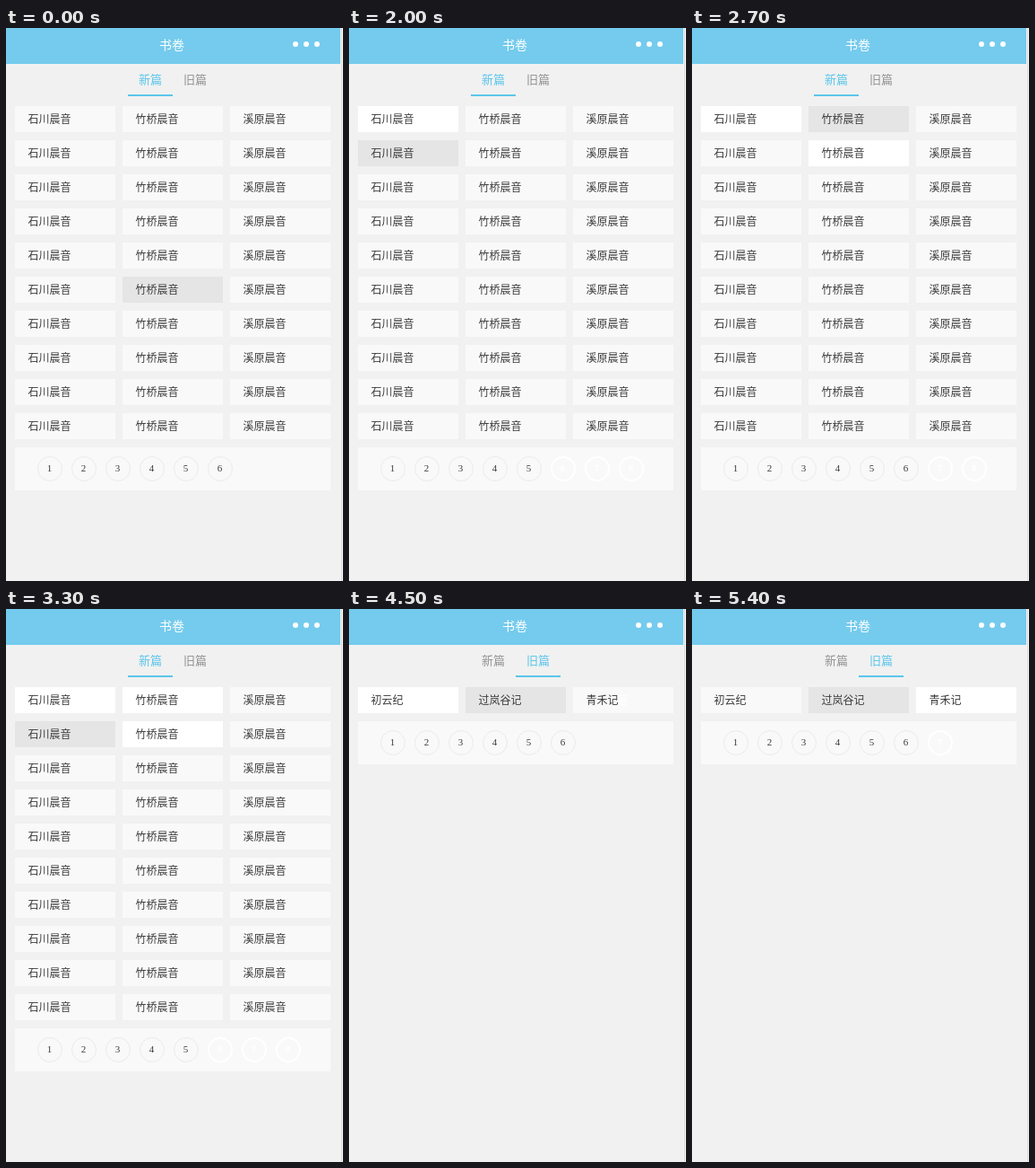
Recreate the animation shown at these times as an HTML page. Size 376x616 px, loop 6.5 s.

```html
<!DOCTYPE html>
<html lang="zh-CN">
<head>
<meta charset="utf-8">
<style>
  html, body { margin: 0; height: 100%; overflow: hidden; background: #f1f1f1; }
  svg { display: block; width: 376px; height: 616px; }
  text { font: 12px "Noto Sans CJK SC", "Noto Sans CJK", sans-serif; fill: #3c3c3c; }
  .title { font-size: 14px; fill: #fff; text-anchor: middle; }
  .tab { font-size: 13px; fill: #929292; text-anchor: middle; }
  .tab.on { fill: #5bc5ea; }
  .num { font: 11px "Liberation Serif", serif; text-anchor: middle; }
  .ring { fill: none; stroke: #ebebeb; }
  .ring.faded { stroke: #fff; stroke-width: 2; }
  .faded { fill: #fff; }
  .num.faded { font-weight: bold; }
</style>
</head>
<body>
<svg viewBox="0 0 376 616" id="stage"></svg>
<script>
const LOOP = 6500;
const NEW = ['石川晨音', '竹桥晨音', '溪原晨音'];
const OLD = ['初云纪', '过岚谷记', '青禾记'];

// Cells are "row,column"; count = chapters shown, faded = last chapter still fading out.
const states = [
  { at: 0,    tab: 0, dark: '5,1', white: [], count: 6 },
  { at: 1500, tab: 0, dark: '0,0', white: [], count: 30 },
  { at: 2000, tab: 0, dark: '1,0', white: ['0,0'], count: 5, faded: 8 },
  { at: 2400, tab: 0, dark: '1,1', white: ['0,0'], count: 6, faded: 8 },
  { at: 2700, tab: 0, dark: '0,1', white: ['0,0', '1,1'], count: 6, faded: 8 },
  { at: 3300, tab: 0, dark: '1,0', white: ['0,0', '0,1', '1,1'], count: 5, faded: 8 },
  { at: 3900, tab: 1, white: ['0,0', '0,1'], count: 0, trace: true },
  { at: 4500, tab: 1, dark: '0,1', white: ['0,0'], count: 6, trace: true },
  { at: 4800, tab: 1, dark: '0,0', white: ['0,1'], count: 5, faded: 6, trace: true },
  { at: 5200, tab: 1, dark: '0,2', white: ['0,1'], count: 7 },
  { at: 5400, tab: 1, dark: '0,1', white: ['0,2'], count: 6, faded: 7 }
];

const rect = (x, y, w, h, fill) =>
  `<rect x="${x}" y="${y}" width="${w}" height="${h}" fill="${fill}"/>`;
const text = (x, y, str, cls = '') =>
  `<text x="${x}" y="${y}" class="${cls}">${str}</text>`;

function header(tab) {
  const dots = [323, 335, 347].map(x => `<circle cx="${x}" cy="18" r="3" fill="#fff"/>`);
  return rect(0, 0, 373, 40, '#74cbed') + rect(373, 0, 3, 616, '#f3f3f3') +
    rect(374, 0, 1, 616, '#dadada') + text(185, 24, '书卷', 'title') + dots.join('') +
    ['新篇', '旧篇'].map((s, i) =>
      text(161 + 50 * i, 62, s, i === tab ? 'tab on' : 'tab')).join('') +
    rect(136 + 50 * tab, 74, 50, 2, '#5bc5ea');
}

function cells(s, rows) {
  const names = s.tab ? OLD : NEW;
  let out = '';
  for (let r = 0; r < rows; r++) {
    names.forEach((name, c) => {
      const x = 10 + 120 * c, y = 87 + 38 * r, key = r + ',' + c;
      const fill = key === s.dark ? '#e5e5e5' : s.white.includes(key) ? '#fff' : '#f9f9f9';
      out += rect(x, y, 112, 29, fill) + text(x + 14.5, y + 19, name);
    });
  }
  return out;
}

function chapters(s, top) {
  if (!s.count) return '';
  const total = Math.max(s.count, s.faded || 0);
  let out = rect(10, top, 352, 10 + 38 * Math.ceil(total / 8), '#f9f9f9');
  for (let i = 0; i < total; i++) {
    const x = 49 + 38 * (i % 8), y = top + 24 + 38 * Math.floor(i / 8);
    const cls = i < s.count ? '' : ' faded';
    out += `<circle cx="${x}" cy="${y}" r="${cls ? 13 : 13.5}" class="ring${cls}" style="fill:none"/>` +
      text(x - 0.5, y + 3, i + 1, 'num' + cls);
  }
  return out;
}

function render(s) {
  const rows = s.tab ? 1 : 10;
  const trace = s.trace ? text(300, 106, '音', 'faded') : '';
  return header(s.tab) + cells(s, rows) + trace + chapters(s, 87 + 38 * rows);
}

const stage = document.getElementById('stage');
let shown;
function frame(now) {
  const t = now % LOOP;
  const s = states.findLast(state => state.at <= t) || states[0];
  if (s !== shown) stage.innerHTML = render(shown = s);
  requestAnimationFrame(frame);
}
frame(performance.now());
</script>
</body>
</html>
```
